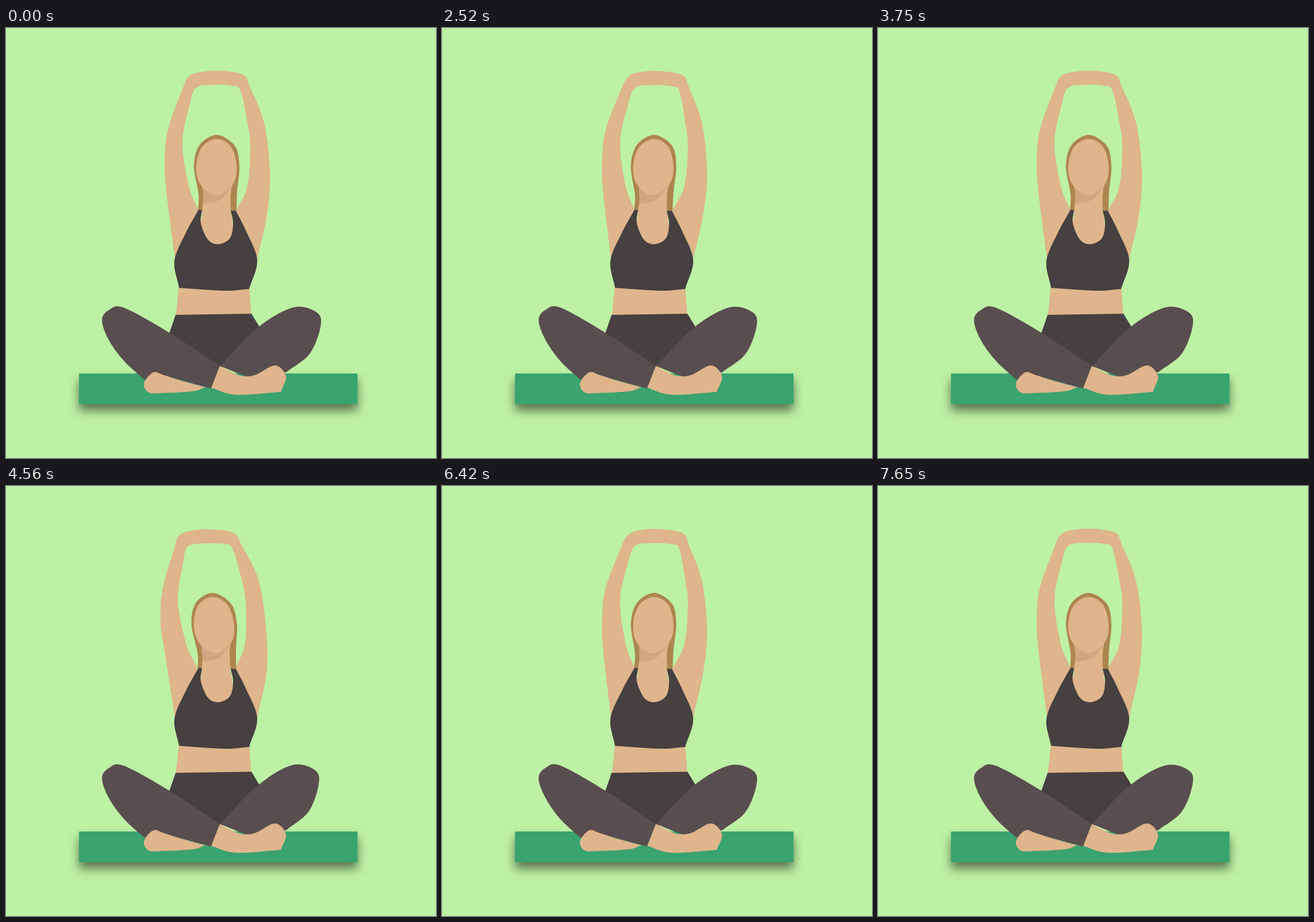
Recreate the animation shown at these times as an HTML page. Size 748 by 748 pixels, loop 8 s.

```html
<!DOCTYPE html>
<html lang="en">
<head>
<meta charset="utf-8">
<title>Seated side stretch</title>
<style>
  html, body { margin: 0; height: 100%; overflow: hidden; background: #bdf1a5; }
  svg { display: block; width: 100vw; height: 100vh; }
  #mat { filter: drop-shadow(0 11px 8.5px rgba(0, 0, 0, .52)); }
</style>
</head>
<body>
<svg id="stage" viewBox="0 0 748 748">
  <rect id="mat" x="127" y="601" width="484.5" height="53.5" fill="#3aa36f"/>
</svg>
<script>
const SKIN = '#deb58c', HAIR = '#ad8550', SHADE = '#cfa582', DARK = '#464040', LEG = '#594e4f';
const LOOP = 8000, HALF = 1950, REST = 300, OUT = 810, BACK = 690;
const RIGHT_REACH = 0.62, MID = 360;

const clamp = v => Math.max(0, Math.min(1, v));
const height = y => Math.max(0, (335 - y) / 255); // 0 at the shoulders, 1 at the hands

// How a point moves when the body leans by a: -1 is fully left, positive is right.
const still = () => [0, 0];

function arms(x, y, a) {
  const h = height(y), top = h ** 4;
  return [a * (18 * clamp(2.6 * h) + 28 * top), top * (0.07 * a * (x - MID) + 3 * Math.abs(a))];
}

const head = (x, y, a) => [36 * a * height(y) ** 1.2, 0];

// Only the knee away from the lean is pulled in.
function knee(x, y, a) {
  if ((x - MID) * a >= 0) return [0, 0];
  const pull = clamp((Math.abs(x - MID) - 75) / 100) * clamp((605 - y) / 60);
  return [8 * a * pull, -1.5 * Math.abs(a) * pull];
}

// Key points of each outline; "!" marks a corner.
const parts = [
  [arms, SKIN, `294,402! 279,285 276,235 281,180 306,109 320,83 350,75 382,75 414,82 425,104
    449,165 459,250 454,325 437,402! 395,350! 401,316! 420,275 425,207 420,165 408,109 395,101
    363,99 331,104 319,136 307,200 318,275 333,313! 345,350!`],
  [head, HAIR, '334,317! 335,290 327,240 337,203 367,186 398,205 406,240 402,285 401,318!'],
  [head, SKIN, '341,270! 344,290 341,318! 338,380! 400,380! 391,318! 391,288 395,268!'],
  [head, SHADE, '341,270! 344,306! 372,299 392,277!'],
  [head, SKIN, '366,193 341,207 331,240 338,272 366,291 395,271 401,240 391,206'],
  [still, SKIN, '301,448! 423,448! 427,502! 295,504!'],
  [still, DARK, `335,316! 341,317! 339,340 352,369 371,376 390,365 395,340 391,318! 400,318!
    418,354 437,404 423,454! 380,457 301,452! 293,405 313,356`],
  [knee, DARK, '295,499! 427,497! 441,520! 372,594! 284,531!'],
  [knee, LEG, '372,588! 357,627! 270,605 241,612! 206,580 179,543 167,508 180,490 206,487 284,530'],
  [still, SKIN, '347,625! 325,632 271,635 248,634 240,618 256,599 275,604 310,615'],
  [knee, LEG, `372,588! 438,521 500,486 541,495 547,520 528,567 487,599! 430,608`],
  [still, SKIN, '372,588! 357,626! 400,638 478,633! 487,606 468,587 432,604 405,604']
];

const parse = text => text.split(/\s+/).map(s => [...s.split(',').map(parseFloat), s.endsWith('!')]);

// Smooth closed curve through the points, sharp at corners.
function outline(pts) {
  const n = pts.length, at = i => pts[(i + n) % n];
  const handle = (p, from, to, sign) => {
    const f = sign / (p[2] ? 3 : 6);
    return `${p[0] + (to[0] - from[0]) * f} ${p[1] + (to[1] - from[1]) * f}`;
  };
  return `M${pts[0][0]} ${pts[0][1]}` + pts.map((a, i) => {
    const b = at(i + 1);
    const out = handle(a, a[2] ? a : at(i - 1), b, 1);
    const into = handle(b, a, b[2] ? b : at(i + 2), -1);
    return `C${out} ${into} ${b[0]} ${b[1]}`;
  }).join('') + 'Z';
}

const stage = document.getElementById('stage');
const figure = parts.map(([move, fill, text]) => {
  const path = document.createElementNS('http://www.w3.org/2000/svg', 'path');
  path.setAttribute('fill', fill);
  stage.append(path);
  return { path, move, pts: parse(text) };
});

const ease = u => u < 0.5 ? 2 * u * u : 1 - 2 * (1 - u) ** 2;

function lean(t) {
  const u = t % HALF - REST;
  const side = Math.floor(t / HALF) % 2 ? RIGHT_REACH : -1;
  return side * ease(clamp(u < OUT ? u / OUT : 1 - (u - OUT) / BACK));
}

function draw(t) {
  const a = lean(t);
  for (const { path, move, pts } of figure) {
    path.setAttribute('d', outline(pts.map(([x, y, corner]) => {
      const [dx, dy] = move(x, y, a);
      return [x + dx, y + dy, corner];
    })));
  }
}

const start = performance.now();
function tick() {
  draw((performance.now() - start) % LOOP);
  requestAnimationFrame(tick);
}
tick();
</script>
</body>
</html>
```
